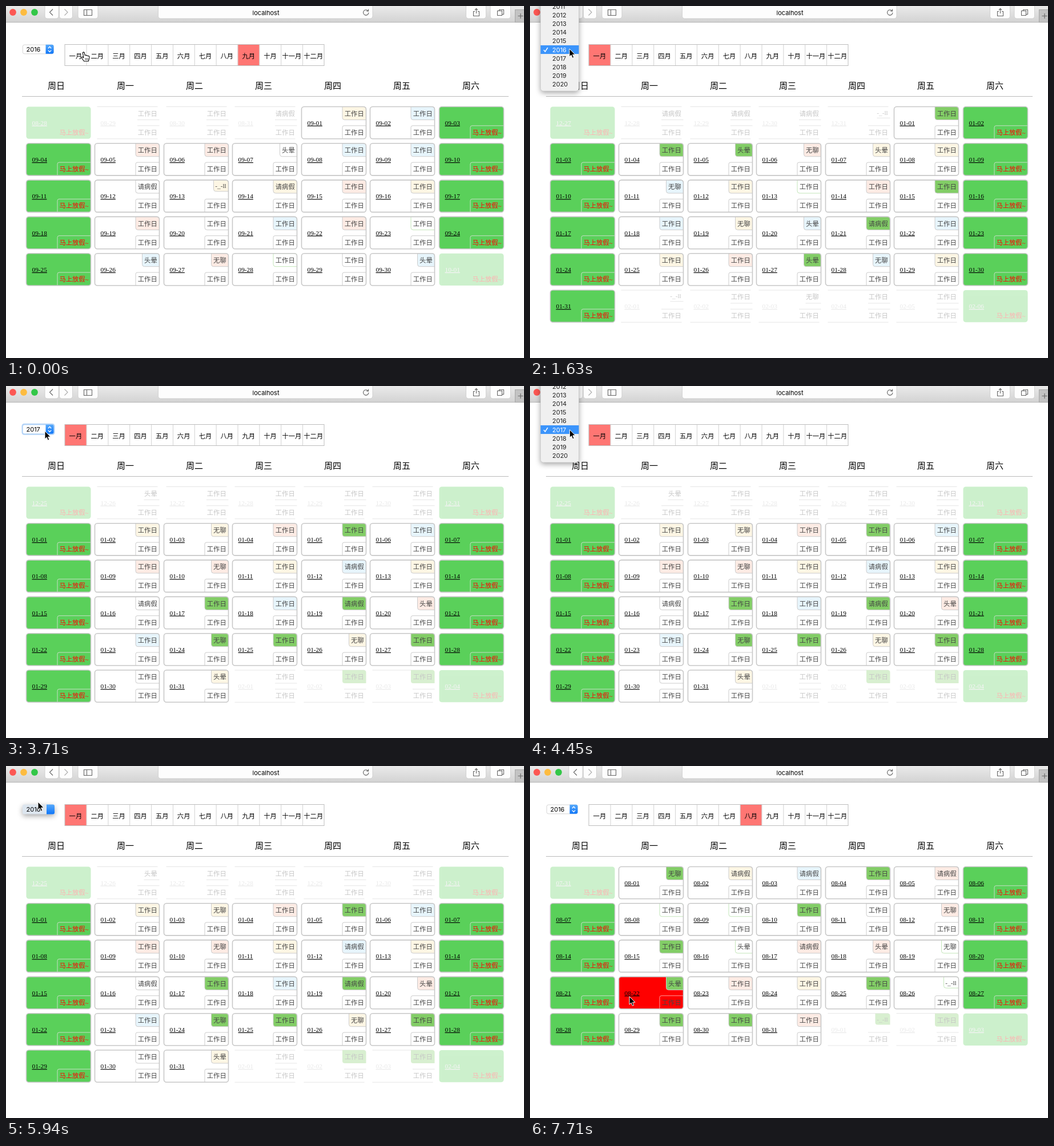
An HTML page for the animation above (8 s loop, 907 px wide and 617 px high).

```html
<!DOCTYPE html>
<html lang="zh-CN">
<head>
<meta charset="utf-8">
<title>Calendar</title>
<style>
html, body { margin: 0; width: 100%; height: 100%; overflow: hidden; background: #fff; }
svg { display: block; font: 11.3px "Liberation Serif", "Noto Sans CJK SC", "Noto Sans CJK", serif; }
.ui { font-family: Inter, Roboto, sans-serif; font-size: 11px; }
.mid { text-anchor: middle; }
.end { text-anchor: end; }
.date { text-decoration: underline; }
.btn { fill: #fdfdfd; stroke: #c9c9c9; stroke-width: .8; }
.icon { fill: none; stroke: #666; stroke-width: 1.1; }
.menu { filter: drop-shadow(0 3px 5px rgba(0, 0, 0, .35)); }
</style>
</head>
<body>
<svg id="stage" width="907" height="617" viewBox="0 0 907 617">
  <defs>
    <linearGradient id="bar" x2="0" y2="1"><stop stop-color="#eaeaea"/><stop offset="1" stop-color="#d3d3d3"/></linearGradient>
    <linearGradient id="cap" x2="0" y2="1"><stop stop-color="#57a9fb"/><stop offset="1" stop-color="#0f76f8"/></linearGradient>
  </defs>
  <g id="chrome"></g>
  <g id="page"></g>
</svg>
<script>
const LOOP = 8000, STEPS = 54, ROW = 15.15, MENU_Y = 76.5;
const LABELS = ['工作日', '请病假', '头晕', '无聊', '-_-ll'];
const TAG_W = [41.5, 41.5, 30, 30, 26];
const FILLS = { w: '#fff', h: '#fff', c: '#fdf6e4', b: '#e7f5fc', p: '#fdebe4', g: '#82cd66' };
const NUMERALS = ['一', '二', '三', '四', '五', '六', '七', '八', '九', '十', '十一', '十二'];

// Per week: five weekday tags, each a label index and a fill key.
const VIEWS = [
  { from: 0, year: 2016, month: 9, tags: '0w0w1w0c0b 0p0p2w0b0b 1w4c1c0p0c 0p0w0b0p0h 2b3p0h0w2b' },
  { from: 3, year: 2016, month: 1, tags: '1w1w1w4w0g 0g2g3p2c0c 3b0c0h0p0g 0b3c2b1g0b 0c0p2g3b0c 4w0w3w0w0w' },
  { from: 20, year: 2017, month: 1, tags: '2w0w0w0w0w 0c3c0p0g0b 0p3p0c1b0c 1w0g0b1g2p 0b3g0g3c0g 0w2c0w0g0g' },
  { from: 41, year: 2016, month: 1, tags: '4g0g2w1g4h 3c1g2p2h2g 0b0p1h0b1h 0b0b0g0p0c 4c1w0c0w0g 1w2w0w3w0w' },
  { from: 48, year: 2016, month: 8, tags: '3g1c1b0g1p 0h0h0g0w3p 0g2h1p2p3h 2g0p0c0g4h 0g0g0p4g0g' }
];

// Pointer keys: step, x, y
const PATH = [[0, 136, 81], [1, 123, 81], [4, 123, 81], [5, 157, 95], [9, 69, 75], [12, 69, 75],
  [15, 56, 92], [21, 56, 92], [25, 68, 79], [27, 72, 78], [29, 72, 78], [34, 59, 71], [36, 56, 63],
  [41, 56, 63], [46, 379, 85], [48, 379, 85], [52, 174, 404], [54, 174, 404]];

const within = (v, a, b) => v >= a && v < b;
const rect = (x, y, w, h, attrs) => `<rect x="${x}" y="${y}" width="${w}" height="${h}" ${attrs}/>`;
const path = (d, attrs) => `<path d="${d}" ${attrs}/>`;
const text = (x, y, s, attrs = '') => `<text x="${x}" y="${y}" ${attrs}>${s}</text>`;

function pointerAt(step) {
  const i = PATH.findIndex(k => k[0] > step);
  const [s, x, y] = PATH[i - 1], [s2, x2, y2] = PATH[i];
  const f = (step - s) / (s2 - s);
  return { x: x + (x2 - x) * f, y: y + (y2 - y) * f };
}

function chrome() {
  const button = (x, w) => rect(x, -5, w, 27, 'rx="4" class="btn"');
  const icon = d => path(d, 'class="icon"');
  return rect(0, 0, 907, 28, 'fill="url(#bar)"') + rect(0, 28, 907, 1, 'fill="#b4b4b4"') +
    ['#fc5753', '#fdbc40', '#33c748'].map((c, i) => `<circle cx="${12 + 19 * i}" cy="11" r="5.9" fill="${c}"/>`).join('') +
    button(68, 24) + button(93.5, 23) + button(126, 35) + button(266.5, 375.5) + button(805.5, 35) + button(848, 35.5) +
    icon('M82 5.5L76.5 11 82 16.5M136.5 6.5h14v10h-14zM141.5 6.5v10') +
    path('M102.5 5.5L108 11l-5.5 5.5', 'class="icon" style="stroke:#aaa"') +
    icon('M634 8.5a4.7 4.7 0 1 0 1 3M634.6 5.5v3.4h-3.4') +
    icon('M821 9.5h-2.5v8h10v-8H826M823.5 13V4.5M821 7l2.5-2.5L826 7') +
    icon('M863.5 8.5V6.5h8v8h-2.5M860.5 8.5h8v8h-8z') +
    rect(891.5, 6.5, 20, 22, 'fill="#c3c3c3" stroke="#a5a5a5"') + icon('M896.5 17.5h9M901 13v9') +
    text(455, 16.3, 'localhost', 'class="ui mid"');
}

function monthBar(month) {
  const w = 37.85;
  return rect(103 + w * (month - 1), 68, w, 36, 'fill="#ff7673"') +
    NUMERALS.map((n, i) => (i ? rect(102.7 + w * i, 68, 1, 36, 'fill="#d2d2d2"') : '') +
      text(103 + w * (i + .5), 91.5, n + '月', 'class="mid"')).join('') +
    rect(103, 67.5, 454, 37, 'fill="none" stroke="#bdbdbd"');
}

function weekdays() {
  return [...'日一二三四五六'].map((d, i) =>
    text(88 + 121 * i, 144.6, '周' + d, 'class="mid" font-size="15"')).join('') +
    rect(28, 158, 852, 1, 'fill="#bbb"');
}

function cell(col, row, label, tag, inMonth, pointer) {
  const x = 35.5 + Math.floor(120.58 * col), y = 176.5 + 64.3 * row, w = 113, h = 56.3, r = x + w, b = y + h;
  const off = col % 6 === 0;
  const hot = inMonth && within(pointer.x, x, r) && within(pointer.y, y, b);
  const fill = hot ? '#f00' : off ? '#5ad05a' : '#fff';
  const lowW = off ? 58.5 : 41.5, tagH = tag && tag[0] === '4' ? 19.8 : 23;
  let out = '';
  if (inMonth || off) out += rect(x, y, w, h, `rx="4.5" fill="${fill}"`);
  else out += path(`M${x + 4} ${y}H${r - 3}M${x + 4} ${b}H${r - 3}`, 'stroke="#aaa"');

  if (tag) {
    const l = r - TAG_W[tag[0]], key = tag[1];
    const edge = !inMonth ? 'none' : key === 'h' ? '#c3e6b9' : '#ccc';
    if (inMonth || key === 'g')
      out += path(`M${l} ${y}H${r - 4}q4 0 4 4V${y + tagH}H${l + 4}q-4 0-4-4z`, `fill="${FILLS[key]}" stroke="${edge}"`);
    else out += path(`M${l + 3} ${y + tagH}H${r}`, 'stroke="#aaa"');
    out += text(r - 3.8, y + (tag[0] === '4' ? 14.3 : 16.2), LABELS[tag[0]], 'class="end" fill="#444"');
  }

  const ll = r - lowW, lt = b - 23;
  if (inMonth)
    out += path(`M${ll} ${b}V${lt + 3}q0-3 3-3H${r}`, `fill="none" stroke="${hot ? '#f99' : off ? '#c5dfc5' : '#ccc'}"`);
  else if (!off) out += path(`M${ll + 3} ${lt}H${r}`, 'stroke="#aaa"');
  out += text(r - 3.8, b - 7, off ? '马上放假~' : '工作日', `class="end" fill="${off ? '#f00' : '#444'}"`);
  out += text(x + 10, y + 32.2, label, `class="date" fill="${inMonth ? '#000' : off ? '#eadcea' : '#b5b5b5'}"`);
  if (inMonth) out += rect(x, y, w, h, 'rx="4.5" fill="none" stroke="#c8c8c8" stroke-width="1.6"');
  return `<g opacity="${inMonth ? 1 : .3}">${out}</g>`;
}

function calendar({ year, month, tags }, pointer) {
  const first = new Date(Date.UTC(year, month - 1, 1));
  const lead = first.getUTCDay() || 7;
  return tags.split(' ').map((week, row) => [0, 1, 2, 3, 4, 5, 6].map(col => {
    const day = new Date(+first + (row * 7 + col - lead) * 864e5);
    const tag = col % 6 ? week.slice(col * 2 - 2, col * 2) : '';
    return cell(col, row, day.toISOString().slice(5, 10), tag, day.getUTCMonth() === month - 1, pointer);
  }).join('')).join('');
}

function select(step, year) {
  const ring = within(step, 20, 29) || within(step, 41, 48);
  const closing = step === 19 || step === 40;
  const value = text(35.5, 80, year, 'class="ui"');
  if (closing)
    return `<g class="menu">${rect(29, 67.5, 56, 17, 'rx="3" fill="#dde6ef"')}</g>` +
      path('M71 67.5h11q3 0 3 3v11q0 3-3 3H71z', 'fill="url(#cap)"') + value;
  return (ring ? rect(27.5, 65.8, 58, 20, 'rx="4.5" fill="#b3d3f7"') : '') +
    rect(29.3, 68, 54, 15.8, `rx="3" fill="#fff" stroke="${ring ? '#b3d3f7' : '#ccc'}" stroke-width=".8"`) +
    path('M69.5 67.8h11q3 0 3 3v10q0 3-3 3h-11z', 'fill="url(#cap)"') +
    path('M73.8 74.2l2.7-2.9 2.7 2.9M73.8 77.6l2.7 2.9 2.7-2.9', 'fill="none" stroke="#fff" stroke-width="1.3"') + value;
}

function menu(current, hovered) {
  const bottom = MENU_Y + (2020 - current) * ROW + 12;
  let out = `<g class="menu">${rect(18.5, -10, 67, bottom + 10, 'rx="5" fill="#f0f0f0" stroke="#c4c4c4" stroke-width=".6"')}</g>`;
  for (let year = 2010; year <= 2020; year++) {
    const y = MENU_Y + (year - current) * ROW, on = year === hovered, ink = on ? '#fff' : '#222';
    if (on) out += rect(18.5, y - 7.6, 67, ROW, 'fill="#3b94fb"');
    out += text(39, y + 4, year, `class="ui" fill="${ink}"`);
    if (year === current) out += path(`M24 ${y + .5}l2.5 3 4.5-7`, `fill="none" stroke="${ink}" stroke-width="1.4"`);
  }
  return out;
}

function cursor({ x, y }, overMenu) {
  const hand = !overMenu && within(x, 103, 557) && within(y, 67, 105);
  const shape = hand
    ? path('M-1.7.8Q-.2-1 1.3.8L2.2 5.5Q3.6 4.4 4.8 6 6.2 5 7.3 6.7 9.8 6 10 8.5L9.4 12 8.3 15.8H.5L-3.6 10Q-4.2 8-2 8.2L-.2 9.8z', 'fill="#fff" stroke="#000" stroke-width="1.1" stroke-linejoin="round"') +
      path('M3 10.5v3M5 10.5v3M7 10.5v3', 'stroke="#000" stroke-width=".8"')
    : path('M0 0V14L3.2 11 5.4 16.2 7.8 15.2 5.6 10.2H10z', 'stroke="#fff"');
  return `<g transform="translate(${x} ${y})">${shape}</g>`;
}

function render(step) {
  const pointer = pointerAt(step);
  const view = VIEWS.filter(v => v.from <= step).pop();
  const year = within(step, 19, 40) ? 2017 : 2016;
  const open = within(step, 11, 19) ? 2016 : within(step, 29, 40) ? 2017 : 0;
  const blink = step === 18 || step === 39;
  const hovered = blink ? 0 : open + Math.round((pointer.y - MENU_Y) / ROW);
  page.innerHTML = monthBar(view.month) + weekdays() + calendar(view, pointer) +
    select(step, year) + (open ? menu(open, hovered) : '') + cursor(pointer, open);
}

const page = document.getElementById('page');
document.getElementById('chrome').innerHTML = chrome();
let shown = -1, start;

function tick(now) {
  start ??= now;
  const t = (now - start) % LOOP;
  const step = Math.min(STEPS - 1, Math.floor((t + 4.5) * STEPS / LOOP));
  if (step !== shown) render(shown = step);
  requestAnimationFrame(tick);
}
requestAnimationFrame(tick);
</script>
</body>
</html>
```
